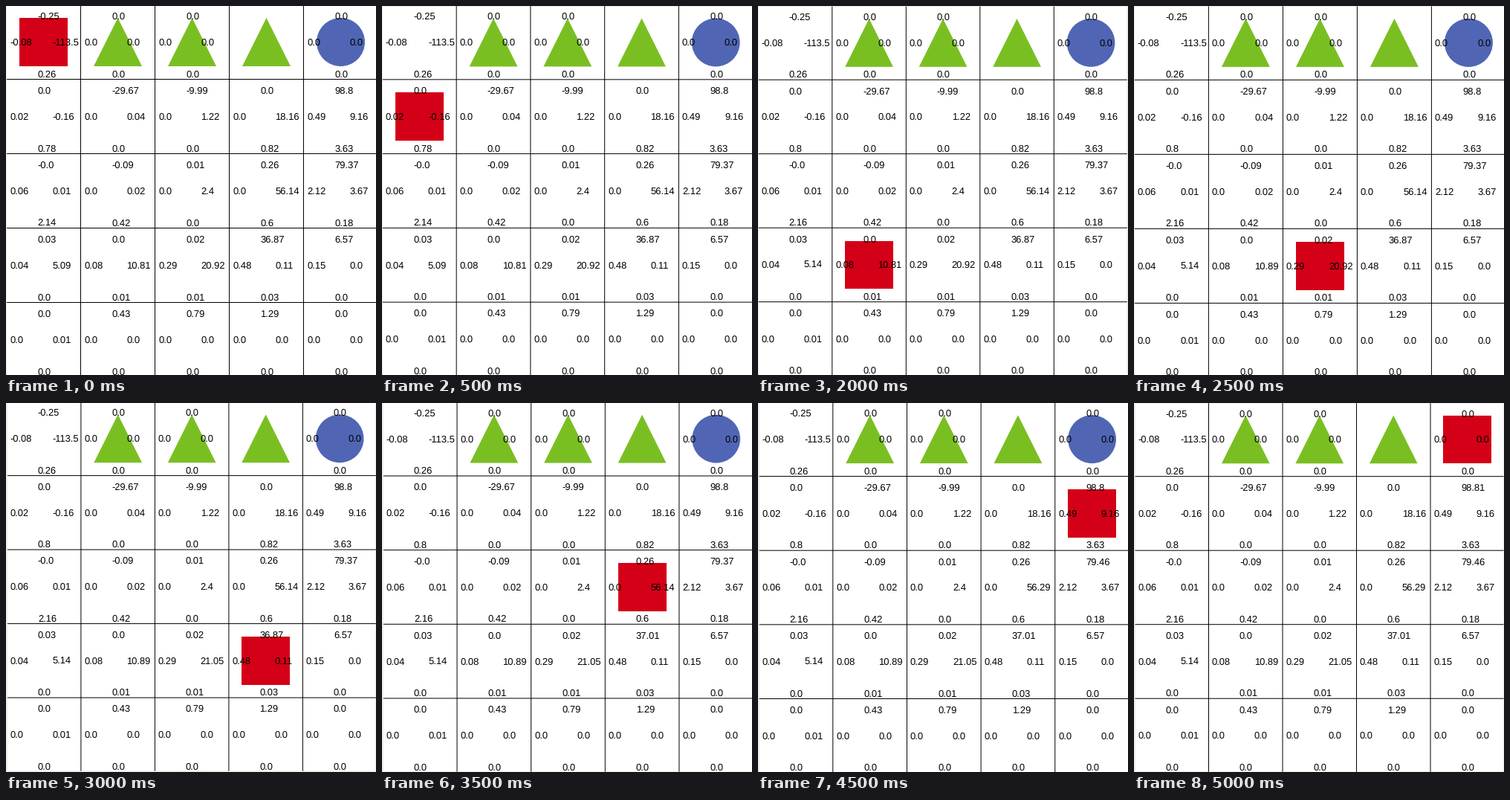
Animation, 498 px wide and 496 px high, one loop 5500 ms. Source, as a matplotlib script:

```python
import matplotlib.pyplot as plt
import numpy as np
from matplotlib.animation import FuncAnimation
from matplotlib.patches import Circle, Polygon, Rectangle

W, H, DPI, STEPS = 498, 496, 64, 11
PX = 72 / DPI
RED, GREEN, BLUE = "#d40018", "#7abf22", "#5066b4"

# Q-learning on a 5x5 grid
ALPHA, GAMMA, REWARD = 0.01, 0.9, 100
GOAL, SILENT = (0, 4), (0, 3)
ACTIONS = "ULRD"
MOVES = [(-1, 0), (0, -1), (0, 1), (1, 0)]

# What has been learned so far; every other value is still zero
LEARNED = """
U-0.25 L-0.08 R-113.5 D0.26 | | | |
L0.02 R-0.16 D0.784 | U-29.67 R0.04 | U-9.99 R1.22 | R18.16 D0.82 | U98.8 L0.49 R9.16 D3.63
U-0.0 L0.06 R0.01 D2.14 | U-0.09 R0.02 D0.42 | U0.01 R2.4 | U0.26 R56.14 D0.6 | U79.367 L2.12 R3.67 D0.18
U0.03 L0.04 R5.09 | L0.08 R10.81 D0.01 | U0.02 L0.29 R20.924 D0.01 | U36.87 L0.48 R0.11 D0.03 | U6.57 L0.15
R0.01 | U0.43 | U0.79 | U1.29 |
"""

# Text anchors for up, left, right, down, in hundredths of a cell
SLOTS = [(41.7, 19.3), (4.5, 54.3), (61.7, 54.3), (41.7, 96.9)]

# Slight drift of the window: step, left, top, cell size
DRIFT = np.array([(0, 0.5, -1.5, 100), (2, 0.3, -0.3, 99.5),
                  (4, 0.3, -0.3, 99.5), (5, 0.4, -0.6, 100),
                  (6, 1.4, -1.9, 99.5), (8, 1.3, -1.4, 99.8),
                  (10, 1, -0.8, 99.5)]).T

plt.rcParams["text.hinting"] = "none"
plt.rcParams["font.family"] = "Liberation Sans"
fig = plt.figure(figsize=(W / DPI, H / DPI), dpi=DPI, facecolor="#efeeea")
ax = fig.add_axes([0, 0, 1, 1])


def learned():
    q = np.zeros((5, 5, 4))
    for r, line in enumerate(LEARNED.strip().splitlines()):
        for c, cell in enumerate(line.split("|")):
            for item in cell.split():
                q[r, c, ACTIONS.index(item[0])] = float(item[1:])
    return q


def walk(n):
    """Agent cell and values after n greedy moves."""
    q, cell = learned(), (0, 0)
    for _ in range(n):
        act = q[cell].argmax()
        dr, dc = MOVES[act]
        nxt = cell[0] + dr, cell[1] + dc
        gain = REWARD if nxt == GOAL else GAMMA * q[nxt].max()
        q[cell][act] += ALPHA * (gain - q[cell][act])
        cell = nxt
    return cell, q


def draw(n):
    ax.clear()
    ax.set(xlim=(0, W), ylim=(H, 0))
    ax.axis("off")
    x0, y0, size = (np.interp(n, DRIFT[0], track) for track in DRIFT[1:])
    agent, q = walk(n)

    def at(cell, dx, dy):
        r, c = cell
        return x0 + size * (c + dx / 100), y0 + size * (r + dy / 100)

    def shape(patch, color, z):
        patch.set(facecolor=color, linewidth=0, zorder=z)
        ax.add_patch(patch)

    left, top = x0 + 1, y0 + 1.5
    right, bottom = x0 + 4.985 * size, y0 + 4.985 * size
    shape(Rectangle((left, top), right - left, bottom - top), "white", 0)
    for k in range(1, 5):
        x, y = at((k, k), 0, 0)
        for xs, ys in (([x, x], [top, bottom]), ([left, right], [y, y])):
            ax.plot(xs, ys, color="black", lw=PX, snap=False, zorder=1)

    for c in (1, 2, 3):
        corners = (50, 17.5), (82.5, 82.5), (17.5, 82.5)
        shape(Polygon([at((0, c), *p) for p in corners]), GREEN, 2)
    if agent != GOAL:
        shape(Circle(at(GOAL, 50, 50), 0.325 * size), BLUE, 2)
    shape(Rectangle(at(agent, 17.5, 17.5), 0.65 * size, 0.65 * size), RED, 3)

    for cell in np.ndindex(5, 5):
        if cell == SILENT:
            continue
        for value, slot in zip(q[cell], SLOTS):
            ax.text(*at(cell, *slot), str(round(float(value), 2)),
                    size=0.13 * size * PX, color="black", zorder=4)
    return []


anim = FuncAnimation(fig, draw, frames=STEPS, init_func=lambda: [],
                     interval=500, repeat=True, repeat_delay=0)
plt.show()
```
